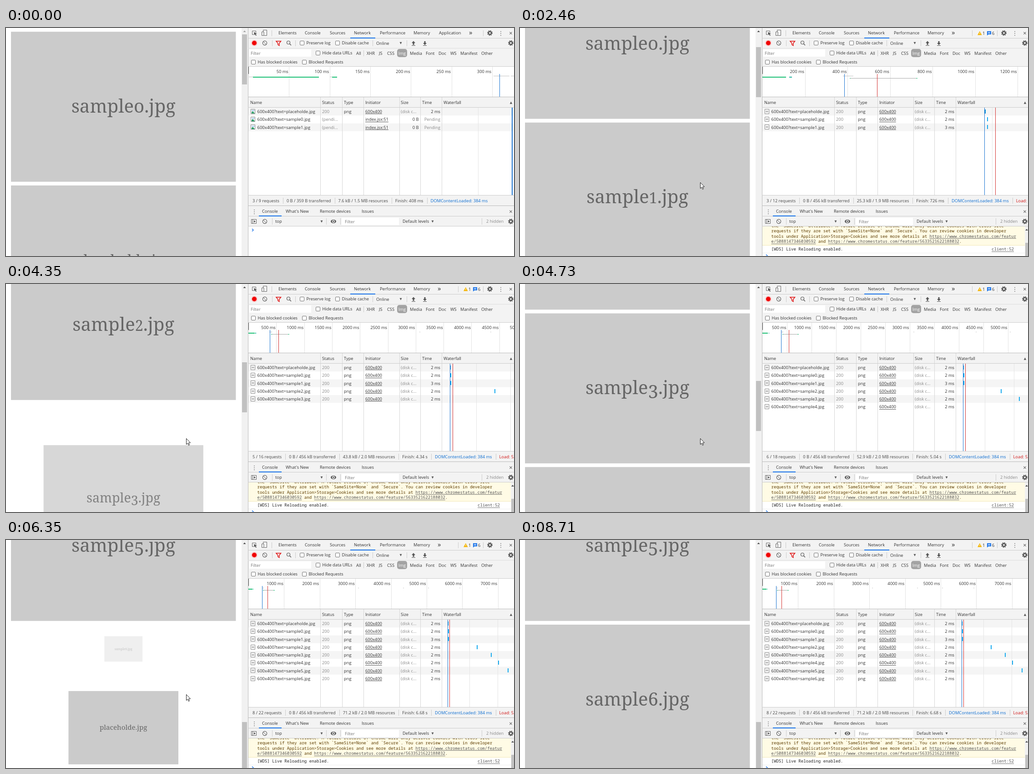
An HTML page with a canvas that plays this animation: 1117x501 px, repeating every 8990 ms.

```html
<!DOCTYPE html>
<html lang="en">
<head>
<meta charset="utf-8">
<title>Lazy loading images</title>
<style>
html, body { margin: 0; width: 100%; height: 100%; overflow: hidden; background: #fff; }
canvas { display: block; }
</style>
</head>
<body>
<canvas id="stage" width="1117" height="501"></canvas>
<script>
const c = document.getElementById('stage').getContext('2d');
const LOOP = 8990;
const SANS = '"Open Sans", sans-serif', MONO = '"Noto Sans Mono", monospace';
const SYMBOL = '"DejaVu Sans", sans-serif', SERIF = '"Noto Serif", serif';
const INK = '#333', DIM = '#888', BLUE = '#1a73d0', RED = '#d3302f', BAR = '#f3f3f3', LINE = '#ccc';
const clamp = (v, a = 0, b = 1) => Math.min(b, Math.max(a, v));

// Linear interpolation through [time, value] points
function track(points, t) {
  if (t <= points[0][0]) return points[0][1];
  for (let i = 1; i < points.length; i++) {
    const [t0, v0] = points[i - 1], [t1, v1] = points[i];
    if (t <= t1) return v0 + (v1 - v0) * (t - t0) / (t1 - t0);
  }
  return points[points.length - 1][1];
}

// ---------- drawing helpers ----------
function box(x, y, w, h, color) { c.fillStyle = color; c.fillRect(x, y, w, h); }
const hline = (y, color = LINE) => box(532, y, 585, 1, color);
const vline = (x, y, h, color = LINE, w = 1) => box(Math.round(x), y, w, h, color);

// y is the optical middle of the line; returns the text width
function text(str, x, y, { color = INK, size = 9.3, font = SANS, align = 'left', underline = false } = {}) {
  c.font = `${size}px ${font}`;
  c.textAlign = align;
  c.fillStyle = color;
  c.fillText(str, x, y + size * 0.36);
  const w = c.measureText(str).width;
  if (underline) c.fillRect(align === 'right' ? x - w : x, Math.round(y + size * 0.5), w, 0.8);
  return w;
}
const symbol = (str, x, y, size, color = '#5a5a5a') => text(str, x, y, { size, color, font: SYMBOL, align: 'center' });

function path(points, { fill, stroke, width = 1, close = true }) {
  c.beginPath();
  for (let i = 0; i < points.length; i += 2) c.lineTo(points[i], points[i + 1]);
  if (close) c.closePath();
  if (fill) { c.fillStyle = fill; c.fill(); }
  if (stroke) { c.strokeStyle = stroke; c.lineWidth = width; c.stroke(); }
}
function disc(x, y, r, color) {
  c.beginPath();
  c.arc(x, y, r, 0, 7);
  c.fillStyle = color;
  c.fill();
}
function ring(x, y, r, color, width = 1.2, dash = []) {
  c.beginPath();
  c.arc(x, y, r, 0, 2 * Math.PI);
  c.setLineDash(dash);
  c.strokeStyle = color;
  c.lineWidth = width;
  c.stroke();
  c.setLineDash([]);
}
function gear(x, y) {
  const tooth = 2 * Math.PI * 5 / 16;
  ring(x, y, 3.2, '#5a5a5a', 2.6);
  ring(x, y, 5, '#5a5a5a', 2, [tooth, tooth]);
}
function frame(x, y, w, h, color = '#666', r = 0) {
  c.beginPath();
  c.roundRect(x, y, w, h, r);
  c.strokeStyle = color;
  c.lineWidth = 1;
  c.stroke();
}
function checkbox(x, y, label) {
  box(x - 4.5, y - 4.5, 9, 9, '#fff');
  frame(x - 4.5, y - 4.5, 9, 9, '#767676', 1.5);
  text(label, x + 9.5, y);
}
function clearIcon(x, y) {
  ring(x, y, 4.6, '#5a5a5a');
  path([x - 3.2, y - 3.2, x + 3.2, y + 3.2], { stroke: '#5a5a5a', close: false });
}

// ---------- page with images ----------
const WIDTH = 494.4, HEIGHT = 329.6, PITCH = 337.8;
const SCROLL = [[2100, 0], [2460, 138], [3510, 380], [4350, 758], [5420, 1317], [6250, 1849]];
const LOADED = [-900, 140, 2550, 3830, 4380, 5400, 6160];
const ENTER = ['fade', 'fade', 'fade', 'growBelow', 'fade', 'slide', 'growAbove'];

// Digits are set as old-style figures: 0 to 2 are low, 3 to 5 hang below the baseline
function caption(label) {
  c.fillStyle = '#666';
  if (label === null) {
    c.font = `31px ${SERIF}`;
    c.textAlign = 'center';
    c.fillText('placeholde.jpg', 0, 10);
    return;
  }
  c.textAlign = 'left';
  const size = 40.2, full = `${size}px ${SERIF}`;
  const low = label === 1 || label === 2, hanging = label > 2 && label < 6;
  const parts = [
    ['sample', full, 0],
    [label === 0 ? 'o' : String(label), low ? `${size * 0.8}px ${SERIF}` : full, hanging ? 8.5 : 0],
    ['.jpg', full, 0],
  ];
  const widths = parts.map(([s, f]) => (c.font = f, c.measureText(s).width));
  let x = -(widths[0] + widths[1] + widths[2]) / 2;
  parts.forEach(([s, f, drop], i) => {
    c.font = f;
    c.fillText(s, x, 12.9 + drop);
    x += widths[i];
  });
}
function card(label, cy, { scale = 1, alpha = 1, dx = 0, skew = 0 } = {}) {
  if (scale <= 0) return;
  c.save();
  c.globalAlpha = alpha;
  c.transform(scale, 0, skew, scale, 258.2 + dx, cy);
  box(-WIDTH / 2, -HEIGHT / 2, WIDTH, HEIGHT, '#cbcbcb');
  caption(label);
  c.restore();
}
function slot(i, top, p) {
  const mid = top + HEIGHT / 2;
  if (p >= 1) return card(i, mid);
  if (p <= 0) return card(null, mid);
  if (ENTER[i] === 'fade') {
    card(null, mid);
    card(i, mid, { alpha: p });
  } else if (ENTER[i] === 'slide') {
    c.save();
    c.beginPath();
    c.rect(11, top, WIDTH, HEIGHT);
    c.clip();
    card(i, mid, { alpha: 0.35 + 0.65 * p });
    card(null, mid, { dx: -WIDTH * p - 2, skew: -0.02 });
    c.restore();
  } else {
    // both pictures share the slot while one grows and the other shrinks
    const a = 1 - (1 - p) ** 1.35, total = HEIGHT + 24 * (1 - a);
    const above = ENTER[i] === 'growAbove';
    const newMid = above ? total * a / 2 : total * (1 - a / 2);
    const oldMid = above ? total * (1 + a) / 2 : total * (1 - a) / 2;
    card(null, top + oldMid, { scale: 1 - 1.66 * a });
    card(i, top + newMid, { scale: 1 - 1.2 * (1 - a), alpha: a });
  }
}
function page(t) {
  const scroll = track(SCROLL, t);
  LOADED.forEach((start, i) => {
    const top = 8.2 + PITCH * i - scroll;
    if (top < 501 && top + HEIGHT > 0) slot(i, top, clamp((t - start) / 800));
  });
  box(518, 0, 14, 501, '#f1f1f1');
  box(519, Math.floor(14 + scroll * 0.2088), 11, 110, '#c1c1c1');
  path([521.5, 9, 527.5, 9, 524.5, 5.5], { fill: scroll ? '#505050' : '#a3a3a3' });
}

// ---------- developer tools ----------
const REQUESTS = [390, 420, 420, 3070, 4340, 5040, 5920, 6680];
// from, rows, requests, tick in ms, tick in px, waterfall px/ms, waterfall grid, resources, finish
const STATES = [
  [0, 3, 9, 50, 89.3, 0, 79.5, '7.6 kB / 1.5 MB', '408 ms'],
  [140, 3, 12, 200, 93.5, 0.154, 79.5, '25.3 kB / 1.9 MB', '726 ms'],
  [2550, 4, 14, 500, 95.8, 0.0508, 53.5, '34.5 kB / 2.0 MB', '3.07 s'],
  [3830, 5, 16, 500, 61.3, 0.0366, 75.5, '43.8 kB / 2.0 MB', '4.34 s'],
  [4380, 6, 18, 500, 54, 0.031, 64, '52.9 kB / 2.0 MB', '5.04 s'],
  [5400, 7, 20, 1000, 98, 0.0269, 56, '61.8 kB / 2.0 MB', '5.92 s'],
  [6160, 8, 22, 1000, 78.4, 0.0239, 61.3, '71.2 kB / 2.0 MB', '6.68 s'],
];

function labels(y, list) { for (const [x, str] of list) text(str, x, y); }

function toolbars(loaded) {
  box(532, 0, 585, 501, BAR);
  vline(532, 0, 501, '#bbb');
  // main tabs
  frame(541.5, 6.5, 8, 8);
  box(545, 10, 7, 7, BAR);
  path([545, 9, 552, 12, 549, 13, 551, 16, 549.5, 17, 547.5, 14, 546, 16], { fill: '#555' });
  frame(565.5, 4.5, 8, 12);
  box(561.5, 8, 6, 9, BAR);
  frame(562.5, 8.5, 4.5, 8);
  vline(584, 5, 13);
  labels(11, [[599, 'Elements'], [657, 'Console'], [712, 'Sources'], [765, 'Network'], [822, 'Performance'], [896, 'Memory']]);
  if (loaded) {
    text('»', 949, 10, { size: 15 });
    vline(994, 5, 13);
    path([1006, 15.5, 1015.5, 15.5, 1010.8, 7], { fill: '#f4b400' });
    box(1010.3, 10, 1, 3, '#fff');
    text('1', 1017, 11.5);
    path([1027, 7, 1036, 7, 1036, 14, 1030, 14, 1027, 16.5], { fill: '#1a73e8' });
    box(1029, 9, 5, 1, '#fff');
    box(1029, 11, 5, 1, '#fff');
    text('6', 1038, 11.5);
  } else {
    text('Application', 952, 11);
    text('»', 1018, 10, { size: 15 });
  }
  vline(1049, 5, 13);
  gear(1064, 11);
  gear(1110, 33);
  symbol('⋮', 1088, 11, 13);
  symbol('✕', 1110, 11, 10);
  hline(22);
  box(757, 21, 55, 2, '#1a73e8');

  // network toolbar
  disc(546, 33, 7, '#f9caca');
  disc(546, 33, 5, '#f00000');
  clearIcon(569, 33);
  path([594, 29, 604.5, 29, 600.8, 33.5, 600.8, 38.5, 597.8, 36.5, 597.8, 33.5], { stroke: '#e01010', width: 1.5 });
  ring(621, 32, 3.5, '#5a5a5a');
  path([623.5, 34.5, 627, 38], { stroke: '#5a5a5a', width: 1.5, close: false });
  for (const x of [585, 636, 806, 881]) vline(x, 27, 13);
  checkbox(651, 33, 'Preserve log');
  checkbox(729, 33, 'Disable cache');
  text('Online', 814, 33.5);
  symbol('▼', 868, 33, 6.5);
  for (const [x, d] of [[896, 1], [921, -1]]) {
    path([x - 4, 33, x, 33 - 4.5 * d, x + 4, 33], { fill: '#555' });
    box(x - 1.5, d > 0 ? 33 : 29, 3, 4, '#555');
    box(x - 4, 38, 8, 1, '#555');
  }
  hline(44, '#ddd');

  // filters
  box(535, 47, 136, 16, '#fff');
  text('Filter', 538, 55.5, { color: '#777' });
  checkbox(686, 55, 'Hide data URLs');
  vline(786, 49, 13);
  c.beginPath();
  c.roundRect(860, 46, 22, 18, 5);
  c.fillStyle = '#a3a3a3';
  c.fill();
  labels(56, [[770, 'All'], [793, 'XHR'], [820, 'JS'], [838, 'CSS'], [888, 'Media'], [923, 'Font'], [951, 'Doc'], [977, 'WS'], [999, 'Manifest'], [1045, 'Other']]);
  text('Img', 871, 56, { color: '#fff', align: 'center' });
  checkbox(544, 75, 'Has blocked cookies');
  checkbox(656, 75, 'Blocked Requests');
  hline(84);
}

function overview([, rows, , tick, px], loaded) {
  box(533, 85, 584, 66, '#fff');
  for (let k = 1; k < 11; k++) {
    const x = 533 + k * px;
    vline(x, 85, 66, '#e2e2e2');
    text(`${k * tick} ms`, x - 1.5, 96, { align: 'right' });
  }
  vline(533, 85, 16, '#555');
  const GREEN = '#1bbf74', GREY = '#c4c4c4';
  if (!loaded) {
    box(534, 107, 9, 1, GREY);
    box(543, 107, 145, 2, GREEN);
    box(712, 107, 6, 1, GREY);
    box(717, 107, 11, 2, GREEN);
    box(1072, 105, 35, 1, GREY);
    box(1110, 105, 7, 1, GREY);
    vline(1085, 101, 50, BLUE);
  } else {
    const at = ms => Math.round(533 + ms * px / tick);
    const span = (a, b, y, h, color) => box(at(a), y, at(b) - at(a), h, color);
    span(0, 111, 107, 2, GREEN);
    span(126, 139, 107, 2, '#24b3a0');
    span(378, 428, 105, 1, GREY);
    span(410, 727, 110, 1, '#aaa');
    box(at(410), 110, 2, 1, GREEN);
    box(at(727) - 2, 110, 3, 1, GREEN);
    for (const ms of REQUESTS.slice(3, rows)) box(at(ms), 105, 2, 1, GREY);
    vline(at(384), 101, 50, BLUE);
    vline(at(539), 101, 50, RED);
  }
  hline(151, '#bbb');
}

function rowIcon(y, loaded) {
  const top = Math.round(y) - 5.5;
  box(538.5, top, 9, 10, '#fff');
  frame(538.5, top, 9, 10, '#8a8a8a');
  if (loaded) {
    box(540.5, top + 3.5, 5, 1, '#888');
    box(540.5, top + 5.5, 5, 1, '#888');
  } else {
    path([540, y + 4, 540, y + 1, 543, y - 1, 547, y + 4], { fill: '#2f9e69' });
    box(540.5, y - 3.5, 6, 2, '#9cc4ec');
  }
}

function table([, rows, , , , scale, grid], loaded) {
  labels(164, [[537, 'Name'], [695, 'Status'], [743, 'Type'], [790, 'Initiator'], [868, 'Size'], [915, 'Time'], [962, 'Waterfall']]);
  symbol('▲', 1110.5, 163, 7);
  box(533, 175, 584, 192, '#fff');
  for (let i = 0; i < rows; i += 2) box(533, 175 + i * 17.25, 584, 17.25, '#f5f5f5');
  for (const x of [691, 739, 786, 865, 911, 958]) vline(x, 152, 215, '#d6d6d6');
  for (let x = 958 + grid; x < 1117; x += grid) vline(x, 175, 192, '#e4e4e4');
  hline(174);
  for (let i = 0; i < rows; i++) {
    const y = 183.8 + i * 17.25, done = loaded || i === 0, dim = { color: DIM };
    rowIcon(y, loaded);
    text(`600x400?text=${i ? 'sample' + (i - 1) : 'placeholde'}.jpg`, 552.5, y, { size: 9.45 });
    text(done ? '200' : '(pendi...', 695, y, dim);
    if (done) text('png', 743, y);
    text(done ? '600x400' : 'index.jsx:51', 790, y, { underline: true });
    if (done) text('(disk c...', 868, y, dim);
    else text('0 B', 907.5, y, { align: 'right' });
    text(done ? (i === 2 ? '3 ms' : '2 ms') : 'Pending', 955, y, { align: 'right', color: done ? INK : DIM });
    if (loaded) vline(962 + REQUESTS[i] * scale, Math.round(y) - 5, 9, i ? '#14a9ee' : '#0d8fd8', 2);
  }
  if (loaded) {
    vline(962.3 + 384 * scale, 175, 192, BLUE);
    vline(962.3 + 539 * scale, 175, 192, RED);
  } else vline(1112, 175, 192, BLUE, 2);
}

function status([, rows, requests, , , , , resources, finish], loaded) {
  hline(367);
  const items = [
    [`${rows} / ${requests} requests`], [`0 B / ${loaded ? '456 kB' : '359 B'} transferred`],
    [`${resources} resources`], [`Finish: ${finish}`], ['DOMContentLoaded: 384 ms', '#0b6cd0'],
  ];
  if (loaded) items.push(['Load: 539 ms', '#d01010']);
  let x = 542;
  items.forEach(([str, color = '#444'], i) => {
    if (i) vline(x - 8, 373, 13);
    x += text(str, x, 380, { color }) + 16;
  });
  hline(390, '#bbb');
}

function drawer(open) {
  symbol('⋮', 546, 403, 13);
  labels(403, [[563, 'Console'], [615, "What's New"], [690, 'Remote devices'], [782, 'Issues']]);
  symbol('✕', 1110, 403, 10);
  hline(413);
  box(556, 412, 50, 2, '#1a73e8');
  frame(539.5, 420.5, 11, 9);
  vline(542, 421, 8, '#666');
  path([545, 422.5, 545, 427.5, 549, 425], { fill: '#555' });
  clearIcon(569, 425);
  for (const x of [585, 704, 735, 1046]) vline(x, 418, 14);
  text('top', 592, 425);
  symbol('▼', 694, 425, 6.5);
  c.beginPath();
  c.ellipse(720, 425, 6, 4, 0, 0, 7);
  c.fillStyle = '#5a5a5a';
  c.fill();
  ring(720, 425, 2.3, '#fff');
  box(738, 417, 126, 16, '#fff');
  text('Filter', 745, 425.5, { color: '#777' });
  text('Default levels', 872, 425);
  symbol('▼', 938, 425, 6.5);
  text('2 hidden', 1056, 425, { color: DIM });
  gear(1110, 425);
  hline(435);
  box(533, 436, 584, 65, '#fff');
  const promptY = open ? 500.5 : 444;
  if (open) consoleLog();
  path([541, promptY - 2.7, 544, promptY, 541, promptY + 2.7], { stroke: '#1a73e8', width: 1.4, close: false });
}

function consoleLog() {
  c.save();
  c.beginPath();
  c.rect(533, 436, 584, 65);
  c.clip();
  box(533, 436, 577, 41, '#fffbe5');
  const style = { size: 9.07, font: MONO, color: '#5c3c00' };
  const linked = { ...style, underline: true, color: '#555' };
  text('the `SameSite` attribute. A future release of Chrome will only deliver cookies with cross-site', 552.5, 435, style);
  text('requests if they are set with `SameSite=None` and `Secure`. You can review cookies in developer', 552.5, 446, style);
  let x = 552.5;
  x += text('tools under Application>Storage>Cookies and see more details at ', x, 457.5, style);
  text('https://www.chromestatus.com/featur', x, 457.5, linked);
  x = 552.5;
  x += text('e/5088147346030592', x, 469, linked);
  x += text(' and ', x, 469, style);
  x += text('https://www.chromestatus.com/feature/5633521622188032', x, 469, linked);
  text('.', x, 469, style);
  box(533, 477, 577, 1, '#f3e9b8');
  text('[WDS] Live Reloading enabled.', 552.5, 486, { ...style, color: '#222' });
  text('client:52', 1086, 486, { ...linked, align: 'right' });
  box(533, 494, 577, 1, '#eee');
  box(1110, 436, 7, 65, '#f1f1f1');
  box(1111, 472, 6, 29, '#c1c1c1');
  path([1111, 445, 1117, 445, 1114, 441.5], { fill: '#505050' });
  c.restore();
}

// ---------- pointer ----------
const POINTER_X = [[1390, 541], [1790, 396], [7740, 396], [7980, 873], [8160, 873], [8700, 1072]];
const POINTER_Y = [[1390, 7], [1790, 339], [7740, 339], [7980, 483], [8160, 483], [8700, 500]];
function pointer(t) {
  if (t < 1390 || t >= 8700) return;
  c.save();
  c.translate(track(POINTER_X, t) + 0.5, track(POINTER_Y, t) + 0.5);
  path([0, 0, 0, 13, 3, 10.3, 5, 15, 7, 14, 5, 9.6, 9, 9.3], { fill: '#fff', stroke: '#222' });
  c.restore();
}

function render(now) {
  const t = now % LOOP;
  const state = STATES.filter(s => s[0] <= t).pop(), loaded = t >= 140;
  box(0, 0, 1117, 501, '#fff');
  page(t);
  toolbars(loaded);
  overview(state, loaded);
  table(state, loaded);
  status(state, loaded);
  drawer(t >= 280);
  pointer(t);
  requestAnimationFrame(tick);
}
const begin = performance.now();
function tick() { render(performance.now() - begin); }
tick();
</script>
</body>
</html>
```
